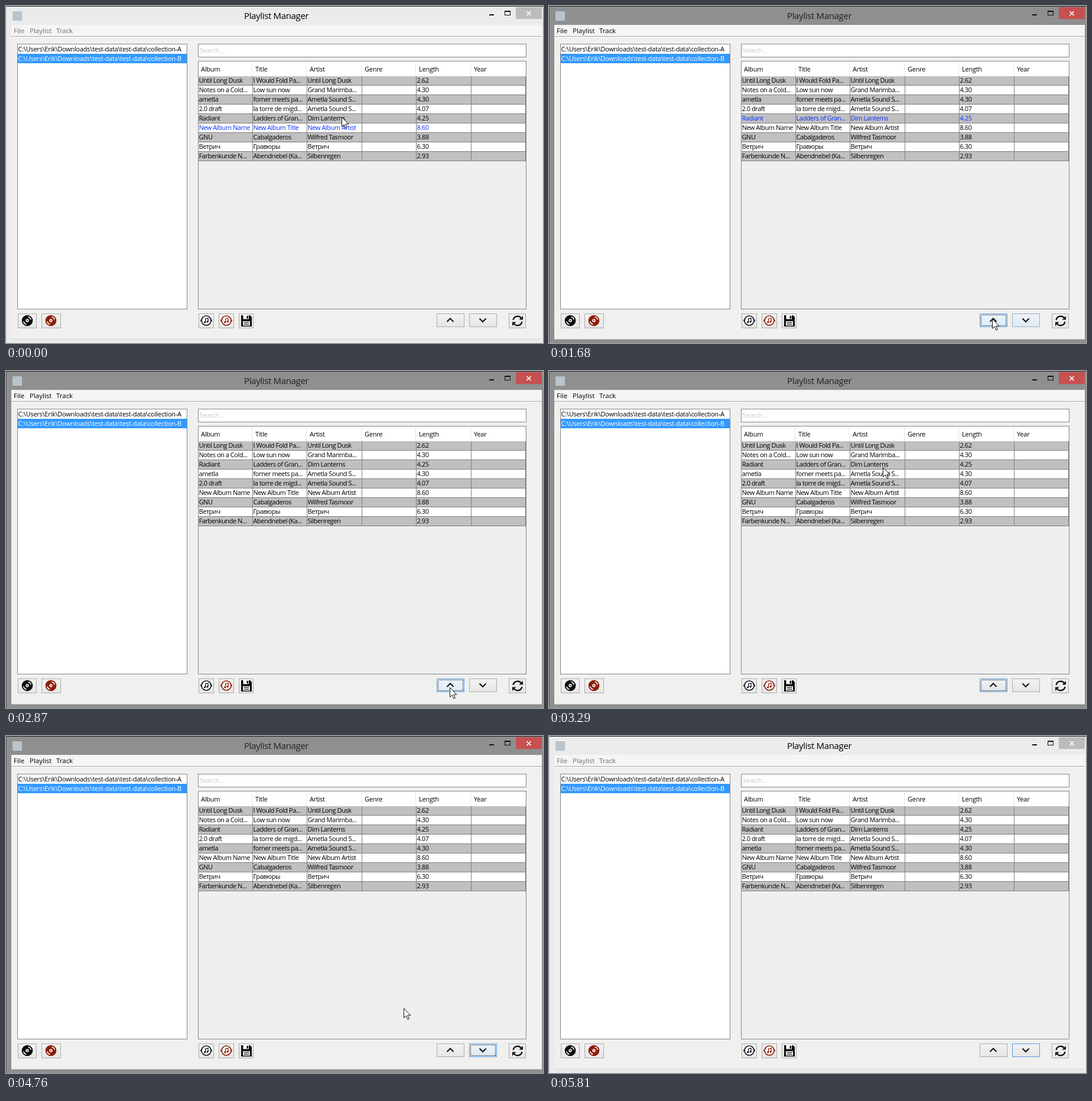
These frames come from a looping animation (909x571 px, 5.88 s). An HTML page:

```html
<!DOCTYPE html>
<html lang="en">
<head>
<meta charset="utf-8">
<title>Playlist Manager</title>
<style>
  html, body { margin: 0; width: 100%; height: 100%; overflow: hidden; background: #f0f0f0; }
  svg { display: block; }
  text { font: 11px "Open Sans", "Noto Sans", sans-serif; letter-spacing: -.25px; white-space: pre; }
  rect { shape-rendering: crispEdges; }
  #rows text { letter-spacing: -.45px; }
  .title { font-size: 15px; letter-spacing: -.35px; }
  .menu { font-size: 11.5px; letter-spacing: 0; }
  .dots { fill: none; stroke: #000; stroke-dasharray: 1 1; }
  .line { fill: none; stroke: currentColor; }
</style>
</head>
<body>
<svg id="stage" width="909" height="571" viewBox="0 0 909 571">
  <defs>
    <linearGradient id="face" x1="0" y1="0" x2="0" y2="1">
      <stop offset="0" stop-color="#f2f2f2"/><stop offset="1" stop-color="#e6e6e6"/>
    </linearGradient>
    <linearGradient id="glow" x1="0" y1="0" x2="0" y2="1">
      <stop offset="0" stop-color="#ecf4fc"/><stop offset="1" stop-color="#dcecfc"/>
    </linearGradient>
    <g id="disc">
      <circle r="9.3" fill="currentColor"/>
      <circle r="2.7" fill="#fff"/><circle r="1.1" fill="currentColor"/>
      <path d="M1.500-6.300A6.500 6.500 0 0 1 6.300-1.500M-1.500 6.300A6.500 6.500 0 0 1-6.300 1.500" fill="none" stroke="#fff" stroke-width="1.500"/>
    </g>
    <g id="note">
      <circle r="8" fill="#fff" stroke="currentColor" stroke-width="1.7"/>
      <path class="line" d="M-9.300-1.500V1.500M9.300-1.500V1.500"/>
      <g transform="scale(.85)">
        <path class="line" d="M-1.600 3.200V-3.600L3.600-4.600V2.200" stroke-width="1.500"/>
        <circle cx="-2.800" cy="3.300" r="1.900" fill="currentColor"/><circle cx="2.400" cy="2.300" r="1.900" fill="currentColor"/>
      </g>
    </g>
  </defs>

  <!-- window frame -->
  <rect id="frame" width="909" height="571"/>
  <rect width="909" height="1" fill="#1c1a20"/>
  <rect id="edge" width="1" height="571"/>
  <rect x="11" y="9" width="16" height="16" fill="#b9c3cb"/>
  <text class="title" id="title" x="403" y="22">Playlist Manager</text>
  <rect x="818" y="14" width="8" height="2" fill="#111"/>
  <path d="M844.5 8.5h9v7h-9zM844 9.5h10" fill="none" stroke="#111" shape-rendering="crispEdges"/>
  <rect id="close" x="863" y="2" width="44" height="20"/>
  <path d="M881.500 9l7 7m0-7l-7 7" stroke="#fff" stroke-width="1.7"/>
  <rect x="9" y="32" width="898" height="533" fill="#f0f0ef"/>
  <rect x="9" y="32" width="898" height="19" fill="#f5f5f5"/>
  <rect x="9" y="51" width="898" height="1" fill="#a5a5a5"/>
  <rect x="9" y="52" width="898" height="1" fill="#fff"/>
  <rect x="9" y="564" width="898" height="1" fill="#d4d4d4"/>
  <g id="menu">
    <text class="menu" x="13" y="46">File</text>
    <text class="menu" x="40" y="46">Playlist</text>
    <text class="menu" x="85" y="46">Track</text>
  </g>

  <!-- collections -->
  <rect x="19.5" y="64.5" width="287" height="449" fill="#fff" stroke="#828790"/>
  <rect x="20" y="81" width="286" height="16" fill="#3399ff"/>
  <text x="20.5" y="77">C:\Users\Erik\Downloads\test-data\test-data\collection-A</text>
  <text x="20.5" y="93" fill="#fff">C:\Users\Erik\Downloads\test-data\test-data\collection-B</text>

  <!-- search and table -->
  <rect x="325.5" y="64.5" width="555" height="22" fill="#fff" stroke="#828790"/>
  <text x="328" y="79" fill="#c9c9c9">Search...</text>
  <rect x="325.5" y="93.5" width="555" height="420" fill="#efefee" stroke="#828790"/>
  <rect x="326" y="94" width="554" height="25" fill="#fff"/>
  <g id="grid"></g>
  <g id="rows"></g>
  <rect class="dots" id="cell" x="510.5" width="91" height="14"/>

  <g id="buttons"></g>
  <use href="#disc" x="36" y="533" color="#0b0b10"/>
  <use href="#disc" x="76" y="533" color="#8c1d08"/>
  <use href="#note" x="339" y="533" color="#10131c"/>
  <use href="#note" x="373" y="533" color="#8c1d08"/>
  <path d="M398 524h15l3 3v16h-18z" fill="#0b0b0b"/>
  <path d="M401.5 524h9.5v6.5h-9.5zM401 534h12v7.5h-12z" fill="#fff"/>
  <path d="M407.5 525h2.5v4.5h-2.5zM402.5 535.5h9v1.2h-9zM402.5 538.5h9v1.2h-9z" fill="#0b0b0b"/>
  <g stroke="#111" fill="none" stroke-width="2">
    <path d="M746.5 535l5.5-5.5 5.500 5.500M801.500 529.500l5.500 5.500 5.500-5.500"/>
    <path d="M858.5 532a7.6 7.6 0 0 1 14-2.5M873.5 535a7.6 7.6 0 0 1-14 2.5" stroke-width="2.3"/>
  </g>
  <path d="M875 525v6.5h-6.5zM857 542v-6.5h6.5z" fill="#111"/>
  <path id="cursor" d="M.5.5V16.5L4.2 13 7 19.2 9.4 18.2 6.7 12.2H11.8Z" fill="#fff" stroke="#111"/>
</svg>
<script>
const LOOP = 5880, STEP = 70;
const $ = id => document.getElementById(id);
const set = (node, attrs) => {
  for (const k in attrs) node.setAttribute(k, attrs[k]);
  return node;
};
const add = (parent, tag, attrs, text = '') => {
  const node = set(document.createElementNS('http://www.w3.org/2000/svg', tag), attrs);
  node.textContent = text;
  return parent.appendChild(node);
};

const heads = ['Album', 'Title', 'Artist', 'Genre', 'Length', 'Year'];
const edges = [325, 417, 509, 602, 694, 787, 879];
const tracks = [
  ['Until Long Dusk', 'I Would Fold Pa...', 'Until Long Dusk', '2.62'],
  ['Notes on a Cold...', 'Low sun now', 'Grand Marimba...', '4.30'],
  ['ametla', 'forner meets pa...', 'Ametla Sound S...', '4.30'],
  ['2.0 draft', 'la torre de migd...', 'Ametla Sound S...', '4.07'],
  ['Radiant', 'Ladders of Gran...', 'Dim Lanterns', '4.25'],
  ['New Album Name', 'New Album Title', 'New Album Artist', '8.60'],
  ['GNU', 'Cabalgaderos', 'Wilfred Tasmoor', '3.88'],
  ['Ветрич', 'Гравюры', 'Ветрич', '6.30'],
  ['Farbenkunde N...', 'Abendnebel (Ka...', 'Silbenregen', '2.93']
];
const rowTop = i => 119 + 16 * i;

// Each entry overrides the state before it; "mid" is the order of rows 2 to 4.
const changes = [
  { t: 0, active: false, mid: [2, 3, 4], sel: 5, cell: false, focus: '' },
  { t: 630, active: true, sel: 4, cell: true },
  { t: 1610, cell: false, focus: 'up' },
  { t: 1750, mid: [2, 4, 3], sel: -1 },
  { t: 2170, sel: 3, cell: true, focus: '' },
  { t: 2800, cell: false, focus: 'up' },
  { t: 2870, mid: [4, 2, 3], sel: -1 },
  { t: 3640, sel: 3, cell: true, focus: '' },
  { t: 4130, cell: false, focus: 'down' },
  { t: 4270, mid: [4, 3, 2], sel: -1 },
  { t: 5740, active: false }
];
const path = [
  [840, 568, 188], [1050, 605, 260], [1190, 700, 430], [1330, 792, 535], [1470, 787, 537],
  [1610, 752, 533], [1680, 750, 530], [1820, 748, 528], [1960, 650, 330], [2100, 568, 172],
  [2240, 568, 174], [2380, 619, 255], [2520, 715, 455], [2660, 755, 550], [2730, 752, 540],
  [2940, 750, 534], [3080, 690, 400], [3220, 580, 200], [3290, 565, 163], [3360, 562, 147],
  [3430, 563, 160], [3570, 566, 172], [3710, 568, 174], [3850, 690, 360], [3990, 800, 524],
  [4130, 803, 538], [4480, 803, 537], [4620, 800, 523], [4690, 742, 497], [4760, 673, 461],
  [4900, 600, 330], [5040, 574, 256]
];

function cursorAt(t) {
  const i = path.findIndex(p => p[0] > t);
  if (i < 1) return path[i ? path.length - 1 : 0].slice(1);
  const a = path[i - 1], b = path[i], f = (t - a[0]) / (b[0] - a[0]);
  return [1, 2].map(k => a[k] + (b[k] - a[k]) * f);
}

// table
tracks.forEach((_, i) => {
  add($('grid'), 'rect', { x: 326, y: rowTop(i), width: 554, height: 15, fill: i % 2 ? '#fff' : '#c0c0c0' });
  add($('grid'), 'rect', { x: 326, y: rowTop(i) + 15, width: 554, height: 1, fill: '#808080' });
});
edges.slice(1).forEach(x => {
  add($('grid'), 'rect', { x: x - 1, y: 94, width: 1, height: 24, fill: '#dfe6ee' });
  add($('grid'), 'rect', { x, y: 119, width: 1, height: 144, fill: '#808080' });
});
heads.forEach((h, i) => add($('grid'), 'text', { x: edges[i] + 5, y: 111 }, h));

const rows = tracks.map(track => {
  const row = add($('rows'), 'g', {});
  track.forEach((s, i) => {
    const col = i < 3 ? i : 4;
    const box = add(row, 'svg', { x: edges[col] + 1, y: 0, width: edges[col + 1] - edges[col] - 1, height: 15 });
    add(box, 'text', { x: .5, y: 11 }, s);
  });
  return row;
});

// buttons
const button = (x, w, h = 25) => add($('buttons'), 'rect',
  { x: x + .5, y: 521.5, width: w - 1, height: h - 1, fill: 'url(#face)', stroke: '#adadad' });
[[20, 32], [60, 33], [326, 26], [360, 26], [394, 25], [851, 29]].forEach(b => button(...b));
const arrows = [['up', 729], ['down', 784]].map(([name, x]) => {
  button(x, 47, 23);
  const glow = set(button(x, 47, 23), { fill: 'url(#glow)', stroke: '#7eb4ea' });
  const edge = set(button(x, 47, 23), { fill: 'none', stroke: '#569de5' });
  const dots = add($('buttons'), 'rect', { class: 'dots', x: x + 2.5, y: 523.5, width: 42, height: 18 });
  return { name, x, glow, edge, dots };
});

// Hover glow fades out after the pointer has left.
function hover(x, t) {
  for (let k = 0; k < 6; k++) {
    const [cx, cy] = cursorAt(t - k * STEP);
    if (cx >= x && cx < x + 47 && cy >= 521 && cy < 544) return 1 - k / 6;
  }
  return 0;
}
const show = (node, on) => set(node, { visibility: on ? 'visible' : 'hidden' });

function draw(t) {
  const s = Object.assign({}, ...changes.filter(c => c.t <= t));
  set($('frame'), { fill: s.active ? '#8f8f8f' : '#ebebeb' });
  set($('edge'), { fill: s.active ? '#55535a' : '#d0d0d0' });
  set($('close'), { fill: s.active ? '#c75050' : '#bcbcbc' });
  set($('title'), { fill: s.active ? '#222' : '#000' });
  set($('menu'), { fill: s.active ? '#000' : '#6d6d6d' });

  [0, 1, ...s.mid, 5, 6, 7, 8].forEach((id, i) =>
    set(rows[id], { transform: `translate(0 ${rowTop(i)})`, fill: i === s.sel ? '#0a32ff' : '#000' }));
  show(set($('cell'), { y: rowTop(s.sel) + .5 }), s.cell);

  for (const a of arrows) {
    set(a.glow, { opacity: hover(a.x, t) });
    show(a.edge, s.focus === a.name);
    show(a.dots, s.focus === a.name && s.active);
  }
  const [x, y] = cursorAt(t).map(Math.round);
  show(set($('cursor'), { transform: `translate(${x} ${y})` }), t < 5740);
}

const start = performance.now();
function tick() {
  const t = (performance.now() - start) % LOOP;
  draw(Math.floor(t / STEP) * STEP);
  requestAnimationFrame(tick);
}
tick();
</script>
</body>
</html>
```
